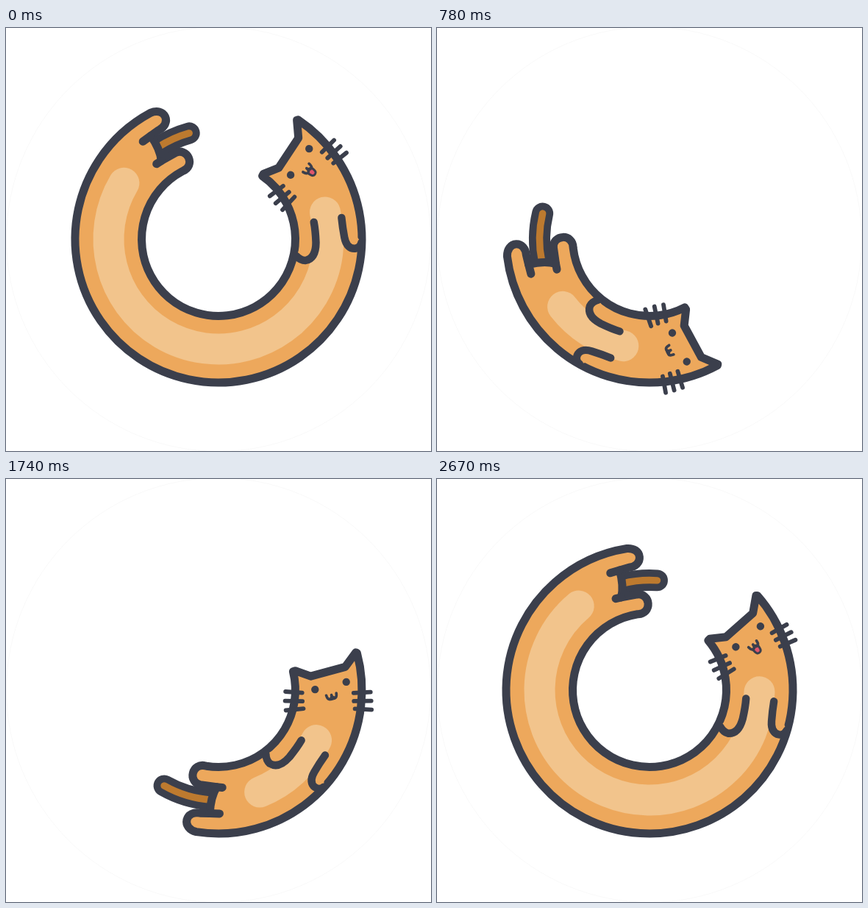
An HTML page with a canvas for the animation above (2.7 s loop, 578 by 575 pixels).

```html
<!DOCTYPE html>
<html lang="en">
<head>
<meta charset="utf-8">
<title>Running cat loop</title>
<style>
  html, body { margin: 0; width: 100%; height: 100%; overflow: hidden; background: #fff; }
  canvas { display: block; }
</style>
</head>
<body>
<canvas id="stage" width="578" height="575"></canvas>
<script>
const ctx = document.getElementById('stage').getContext('2d');
const LOOP = 2700, STEP = 30, REST = 1166;
const DARK = '#3b3f4c', FUR = '#eda85c', BELLY = '#f2c48c', TAIL = '#bd7a2f', TONGUE = '#e0566c';
const OUTER = 195, INNER = 104.5, MIDDLE = 149.5, LINE = 11;
const rad = deg => deg * Math.PI / 180;

// cubic-bezier(h, 0, 1 - h, 1)
function ease(x, h = .495) {
  let u = x;
  for (let i = 0; i < 6; i++) {
    const at = 3 * h * u * (1 - u) * (1 - 2 * u) + u * u * (3 - 2 * u);
    u -= (at - x) / (3 * h * (1 - 6 * u + 6 * u * u) + 6 * u * (1 - u));
  }
  return u * u * (3 - 2 * u);
}

// The hind end accelerates steadily, then snaps after the head.
function hindTurn(x, run) {
  return x < .558 ? 747 * x * x : 720 - 1275 * (1 - run);
}

// Tail reach past the hind paws, in degrees, as [phase, reach]
const tailKeys = [[-.02, 10.5], [.36, 19.7], [.58, 8.8], [.8, 18.2], [.98, 10.5], [1.36, 19.7]];
function tailReach(x) {
  const i = tailKeys.findIndex(key => key[0] > x);
  const [x0, a] = tailKeys[i - 1], [x1, b] = tailKeys[i];
  return a + (b - a) * (1 - Math.cos(Math.PI * (x - x0) / (x1 - x0))) / 2;
}

function stroke(width, color = DARK, path) {
  ctx.lineWidth = width;
  ctx.strokeStyle = color;
  path ? ctx.stroke(path) : ctx.stroke();
}

function fill(color, path) {
  ctx.fillStyle = color;
  path ? ctx.fill(path) : ctx.fill();
}

function band(radius, from, to, width, color) {
  ctx.beginPath();
  ctx.arc(0, 0, radius, rad(from), rad(to));
  stroke(width, color);
}

function turned(deg, draw) {
  ctx.save();
  ctx.rotate(rad(deg));
  draw();
  ctx.restore();
}

const arms = [
  new Path2D('M110 72.5Q104 82 93 94.5C82 106 73 107 66 102.5Q61 98 61 89'),
  new Path2D('M141.5 94Q133 105 126 116C119.5 126 121 133 126 137C130 140 134 140 138 137')
];
const whiskers = new Path2D(
  'M183.5 11L206.5 10.5M183.5 22L207 22.5M184.5 32.5L207 34.5' +
  'M91 5.5L113.5 8M90 18L113.5 19.5M90.5 31L114.5 29.5');
const legCreases = new Path2D('M166 -26L163.3 -39M129 -27L127.9 -34.7');
const lips = new Path2D('M-7 -4Q-6.5 2 -3.5 2Q0 2 0 -3Q0 2 3.5 2Q6.5 2 7 -4');

// Both ends are drawn in their own frame; x points outward, y towards the tail.
function body(head, hind) {
  const span = hind - head;
  ctx.save();
  ctx.beginPath();
  ctx.rotate(rad(head));
  ctx.moveTo(105.3, -22.3);
  ctx.lineTo(126, -14);
  ctx.lineTo(173.5, -25);
  ctx.lineTo(188.6, -44);
  ctx.arc(0, 0, OUTER, rad(-12.8), rad(span - 4));
  ctx.rotate(rad(span));
  ctx.bezierCurveTo(194.3, -4, 189, 2.5, 181.5, 2.5);
  ctx.bezierCurveTo(174, 2.5, 168.8, -4, 168.5, -13);
  ctx.lineTo(166, -26);
  ctx.quadraticCurveTo(144, -22, 129, -27);
  ctx.lineTo(131, -5);
  ctx.bezierCurveTo(131.5, 3, 125, 8.8, 117.5, 8.6);
  ctx.bezierCurveTo(110, 8.4, 104, 3, 104.3, -6);
  ctx.arc(0, 0, INNER, rad(-3.9), rad(-span - 11.8), true);
  ctx.closePath();
  fill(FUR);
  stroke(LINE);
  stroke(LINE, DARK, legCreases);
  ctx.restore();
}

function face(open) {
  stroke(5.8, DARK, whiskers);
  for (const [x, y] of [[174, -4.4], [131.2, 4.2]]) {
    ctx.beginPath();
    ctx.arc(x, y, 5.2, 0, 7);
    fill(DARK);
  }
  ctx.translate(153.8, 15.5);
  ctx.rotate(rad(-11));
  if (open > .05) {
    const depth = 2 + 9 * open;
    ctx.beginPath();
    ctx.moveTo(-4.5, 2);
    ctx.bezierCurveTo(-4.5, depth, -2, depth, 0, depth);
    ctx.bezierCurveTo(2, depth, 4.5, depth, 4.5, 2);
    ctx.lineTo(0, -1);
    fill(TONGUE);
    stroke(3);
  }
  stroke(3.7, DARK, lips);
}

function draw(time) {
  const phase = ((time - REST + LOOP) % LOOP) / LOOP;
  const run = ease(phase);
  const head = 51.7 - 720 * run;
  const hind = 136.7 - hindTurn(phase, run);

  ctx.setTransform(1, 0, 0, 1, 0, 0);
  ctx.clearRect(0, 0, 578, 575);
  ctx.translate(289, 287);
  ctx.lineCap = ctx.lineJoin = 'round';
  band(288.5, 0, 360, 1, '#f9f9f9');

  const tip = hind + tailReach(phase);
  band(MIDDLE, hind - 9, tip, 29, DARK);
  band(MIDDLE, hind - 9, tip, 9.5, TAIL);
  body(head, hind);
  band(MIDDLE, head + 29.3, hind - 35, 42, BELLY);
  turned(head, () => {
    for (const arm of arms) {
      fill(FUR, arm);
      stroke(10.4, DARK, arm);
    }
    face(Math.min(1, Math.max(0, (hind - head - 95) / 130)));
  });
}

function tick() {
  draw(Math.floor(performance.now() % LOOP / STEP) * STEP);
  requestAnimationFrame(tick);
}
tick();
</script>
</body>
</html>
```
